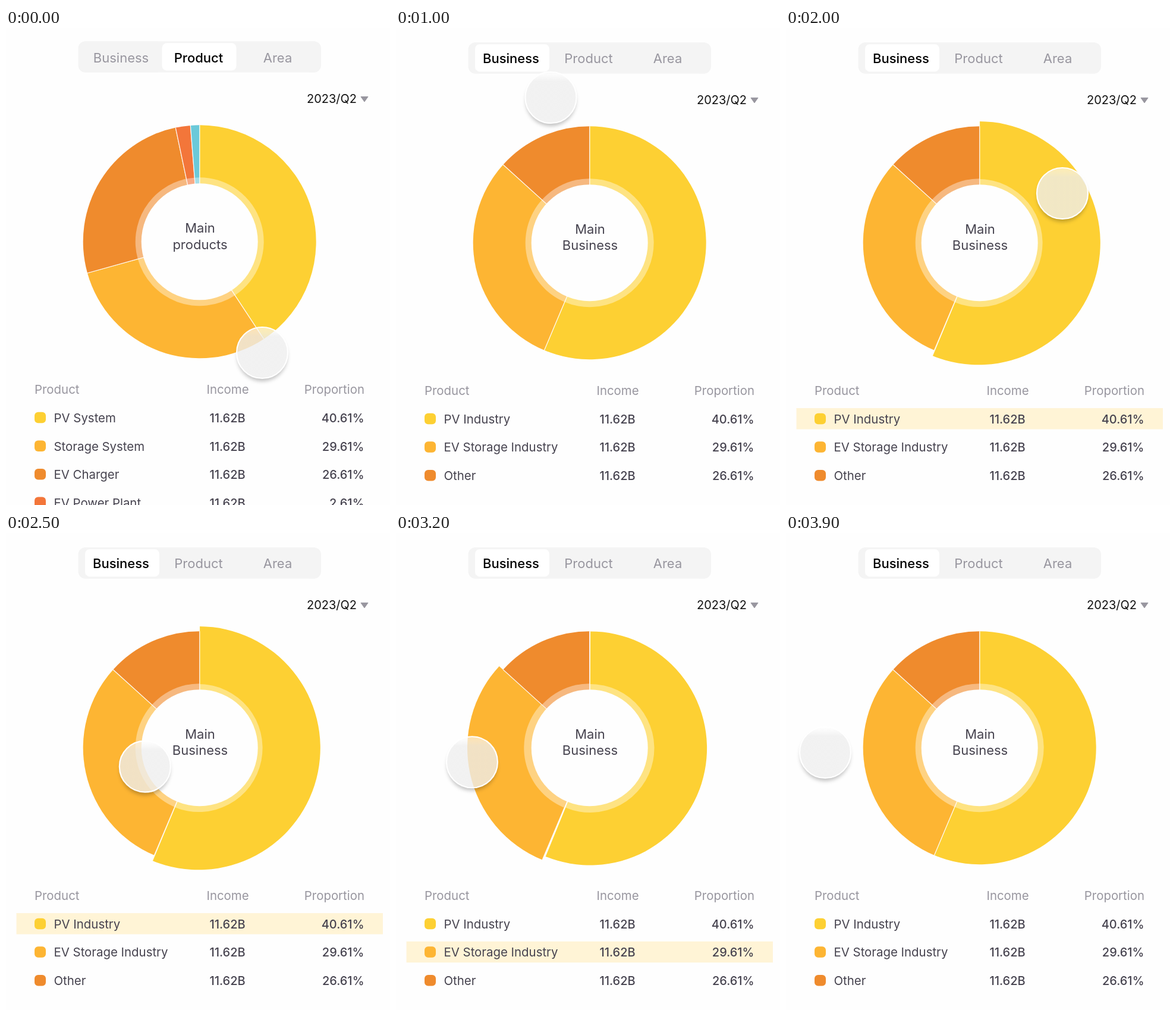
These frames come from a looping animation (646x802 px, 4000 ms). An HTML page:

```html
<!DOCTYPE html>
<html lang="en">
<head>
<meta charset="utf-8">
<title>Revenue breakdown</title>
<style>
html, body { margin: 0; width: 100%; height: 100%; overflow: hidden; background: #fefefe; }
svg { display: block; font-family: Inter, sans-serif; }
</style>
</head>
<body>
<svg id="stage" width="646" height="802" viewBox="0 0 646 802">
  <defs>
    <linearGradient id="glass" x1="0" y1="0" x2="0" y2="1">
      <stop offset="0" stop-color="#fff" stop-opacity=".62"/>
      <stop offset=".18" stop-color="#eee" stop-opacity=".78"/>
      <stop offset="1" stop-color="#eee" stop-opacity=".78"/>
    </linearGradient>
    <filter id="soft" x="-30%" y="-30%" width="160%" height="160%">
      <feGaussianBlur stdDeviation="3"/>
    </filter>
    <mask id="outside" maskUnits="userSpaceOnUse" x="-70" y="-70" width="140" height="140">
      <rect x="-70" y="-70" width="140" height="140" fill="#fff"/>
      <circle r="43" fill="#000"/>
    </mask>
  </defs>
</svg>
<script>
const LOOP = 4000, STEP = 100;
const YELLOW = '#fdd033', AMBER = '#fdb533', ORANGE = '#ef8b2d', CORAL = '#f3763a', TEAL = '#6bc9d9';
const INK = '#46434f', MUTED = '#98969f';
const CX = 325.7, CY = 359.3;
const stage = document.getElementById('stage');

function add(parent, tag, attrs, text) {
  const node = document.createElementNS('http://www.w3.org/2000/svg', tag);
  for (const key in attrs) node.setAttribute(key, attrs[key]);
  if (text) node.textContent = text;
  parent.appendChild(node);
  return node;
}

function label(parent, text, x, y, size, fill, anchor = 'start', weight = 400) {
  return add(parent, 'text', { x, y, fill, 'font-size': size, 'text-anchor': anchor, 'font-weight': weight }, text);
}

const mix = (a, b, k) => a + (b - a) * k;
const blend = (a, b, k) => a.map((v, i) => mix(v, b[i], k));
const clamp = x => Math.max(0, Math.min(1, x));
const smooth = x => x * x * (3 - 2 * x);
const span = (t, from, to) => clamp((t - from) / (to - from));

function polar(x, y, r, deg) {
  const a = deg * Math.PI / 180;
  return (x + r * Math.sin(a)).toFixed(2) + ' ' + (y - r * Math.cos(a)).toFixed(2);
}

// A wedge whose tip stays at the pie centre while its arc may shift and grow.
function makeSlice(parent, fill) {
  const body = add(parent, 'path', { fill });
  const ring = add(parent, 'path', { fill: '#fff', 'fill-opacity': .39 });
  const edge = add(parent, 'path', { fill: 'none', stroke: '#fff', 'stroke-width': 1.2, 'stroke-opacity': .85 });
  return ([x, y, r, inner, a0, a1]) => {
    const big = a1 - a0 > 180 ? 1 : 0;
    const shape = q => `M${CX} ${CY}L${polar(x, y, q, a0)}A${q} ${q} 0 ${big} 1 ${polar(x, y, q, a1)}Z`;
    body.setAttribute('d', shape(r));
    ring.setAttribute('d', shape(inner));
    edge.setAttribute('d', `M${polar(x, y, r, a0)}L${CX} ${CY}L${polar(x, y, r, a1)}`);
  };
}

const rest = (a0, a1) => [CX, CY, 196, 108, a0, a1];

function makeScreen({ dy, active, name, colors, angles, rows }) {
  const g = add(stage, 'g', {});
  add(g, 'rect', { width: 646, height: 802, fill: '#fefefe' });
  const page = add(g, 'g', { transform: `translate(0 ${dy})` });

  add(page, 'rect', { x: 121.5, y: 22.3, width: 408.5, height: 52.5, rx: 12, fill: '#f4f4f4' });
  add(page, 'rect', { x: active ? 262.5 : 133, y: 25.3, width: 125, height: 46.2, rx: 8, fill: '#fff' });
  [['Business', 193.5], ['Product', 324], ['Area', 457]].forEach(([text, x], i) =>
    label(page, text, x, 57.5, 22, i === active ? '#000' : MUTED, 'middle', i === active ? 500 : 400));

  label(page, '2023/Q2', 590, 126, 20, '#111', 'end');
  add(page, 'path', { d: 'M597 115.5H609L603 124Z', fill: MUTED, stroke: MUTED, 'stroke-width': 1, 'stroke-linejoin': 'round' });

  const slices = colors.map(c => makeSlice(page, c));
  slices.forEach((draw, i) => draw(rest(angles[i], angles[i + 1])));
  add(page, 'circle', { cx: CX, cy: CY, r: 98, fill: '#fefefe' });
  label(page, 'Main', 326.5, 344, 22, INK, 'middle');
  label(page, name, 326.5, 371.5, 22, INK, 'middle');

  label(page, 'Product', 48, 615, 20.4, MUTED);
  label(page, 'Income', 373, 615, 20.4, MUTED, 'middle');
  label(page, 'Proportion', 603, 615, 20.4, MUTED, 'end');
  const shares = ['40.61%', '29.61%', '26.61%', '2.61%'];
  const bars = rows.map((text, i) => {
    const y = 663 + i * 47.6;
    const bar = add(page, 'rect', { x: 17.5, y: y - 25.8, width: 616.5, height: 35.5, fill: '#fff4d6', opacity: 0 });
    add(page, 'rect', { x: 48, y: y - 17.2, width: 19, height: 18.5, rx: 6, fill: colors[i] });
    label(page, text, 80.5, y, 20.4, INK);
    label(page, '11.62B', 372.5, y, 20, INK, 'middle', 500);
    label(page, shares[i], 602.5, y, 20, INK, 'end', 500);
    return bar;
  });
  return { g, slices, angles, bars };
}

makeScreen({
  dy: 0, active: 1, name: 'products',
  colors: [YELLOW, AMBER, ORANGE, CORAL, TEAL],
  angles: [0, 146.6, 254.4, 348.1, 355.5, 360],
  rows: ['PV System', 'Storage System', 'EV Charger', 'EV Power Plant']
});
const business = makeScreen({
  dy: 1.9, active: 0, name: 'Business',
  colors: [YELLOW, AMBER, ORANGE],
  angles: [0, 202.9, 312.1, 360],
  rows: ['PV Industry', 'EV Storage Industry', 'Other']
});

const touch = add(stage, 'g', {});
const shade = add(touch, 'g', { mask: 'url(#outside)' });
add(shade, 'circle', { cy: 6, r: 42, fill: '#000', 'fill-opacity': .24, filter: 'url(#soft)' });
add(touch, 'circle', { r: 43, fill: 'url(#glass)', stroke: '#fff', 'stroke-width': 2.2 });

// time, x, y
const stops = [
  [0, 431, 546], [500, 191, 61], [800, 191, 61], [1400, 459, 277], [1800, 465, 278],
  [2100, 465, 278], [2600, 207, 406], [3000, 207, 406], [3370, 66, 369], [4000, 66, 369]
];

function touchAt(t) {
  const i = stops.findIndex(s => s[0] > t);
  const [t0, ...from] = stops[i - 1], [t1, ...to] = stops[i];
  return blend(from, to, smooth(span(t, t0, t1)));
}

// Arc centre, radius, ring radius and angles of the raised and displaced slices
const big = [CX - 1.6, CY + .4, 204.7, 107.5, .4, 202.3];
const nudged = [CX + .8, CY + .8, 196.6, 108, 0, 202.5];
const pulled = [CX - 2.4, CY + .3, 203.3, 108, 202.3, 312.7];

function render(t) {
  const { g, slices, angles, bars } = business;
  g.setAttribute('opacity', span(t, 500, 790));

  const first = span(t, 1850, 1960) * (1 - span(t, 2840, 3000));
  const second = span(t, 2840, 3000) * (1 - span(t, 3640, 3800));
  const base = i => rest(angles[i], angles[i + 1]);
  slices[0](blend(blend(base(0), big, first), nudged, second));
  slices[1](blend(base(1), pulled, second));
  bars[0].setAttribute('opacity', first);
  bars[1].setAttribute('opacity', second);

  touch.setAttribute('transform', `translate(${touchAt(t).join(' ')})`);
}

const start = performance.now();
function tick() {
  const t = (performance.now() - start) % LOOP;
  render(Math.floor(t / STEP) * STEP);
  requestAnimationFrame(tick);
}
tick();
</script>
</body>
</html>
```
